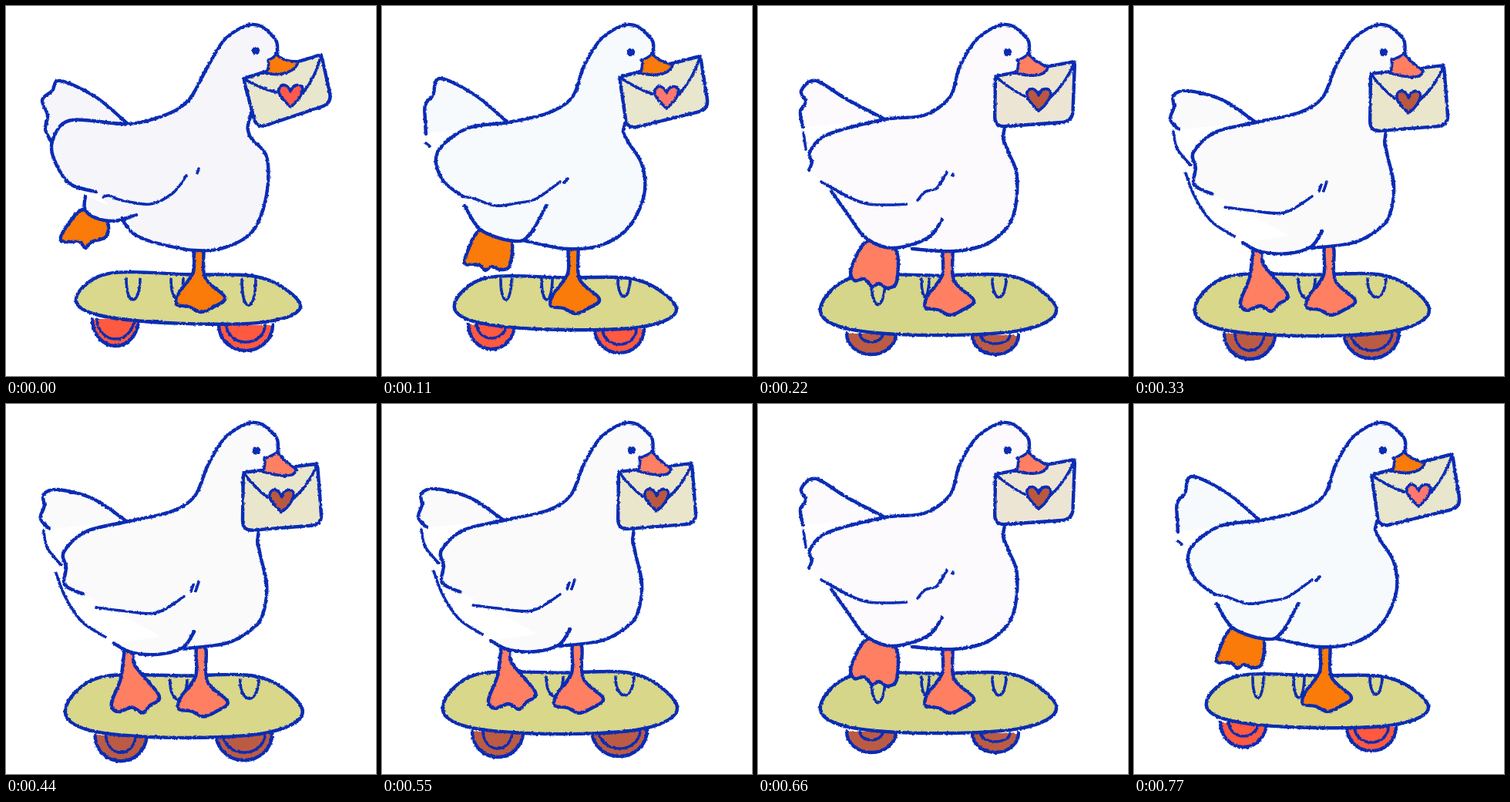
An HTML page that plays this animation: 480 px wide and 480 px high, repeating every 880 ms.

```html
<!DOCTYPE html>
<html lang="en">
<head>
<meta charset="utf-8">
<title>Skateboarding goose</title>
<style>
  html, body { margin: 0; width: 100%; height: 100%; overflow: hidden; background: #fff; }
  svg { display: block; width: 100%; height: 100%; }
  .pose { fill: none; stroke: #0a2cb4; stroke-width: 4.4; stroke-linecap: round; stroke-linejoin: round; }
  .fine { stroke-width: 3.6; }
</style>
</head>
<body>
<svg id="stage" viewBox="0 0 480 480">
  <filter id="crayon" x="0" y="0" width="480" height="480" filterUnits="userSpaceOnUse" color-interpolation-filters="sRGB">
    <feTurbulence type="fractalNoise" baseFrequency=".3" numOctaves="2" seed="4"/>
    <feDisplacementMap in="SourceGraphic" scale="3" xChannelSelector="R" yChannelSelector="G"/>
  </filter>
</svg>
<script>
const parse = text => text.trim().split(/\s+/).map(pair => pair.split(',').map(Number));

// Smooth curve through the points.
function curve(points, closed = false) {
  const n = points.length;
  const at = i => closed ? points[(i + n) % n] : points[Math.max(0, Math.min(n - 1, i))];
  let d = `M${at(0)}`;
  for (let i = 0; i < (closed ? n : n - 1); i++) {
    const [a, b, c, e] = [at(i - 1), at(i), at(i + 1), at(i + 2)];
    d += `C${b.map((v, k) => v + (c[k] - a[k]) / 6)} ${c.map((v, k) => v - (e[k] - b[k]) / 6)} ${c}`;
  }
  return d;
}
const curves = text => text.split('/').map(part => curve(parse(part))).join('');
const blob = text => curve(parse(text), true);
const path = (d, fill = 'none', kind = '', extra = '') => `<path d="${d}" fill="${fill}" class="${kind}" ${extra}/>`;

const HEAD = ' 262,78 285,42 318,24 342,35 351,62 ';
const FRONT_FOOT = blob('244,310 243,345 224,372 221,387 237,390 253,397 268,391 284,378 258,352 256,310');
const HEART = 'M0 15C-8 6-17 0-15-9C-11-17-3-14 0-5C3-15 13-16 16-9C15 2 8 9 0 15Z';
const BREAD = parse('0,.55 .14,.05 .5,.02 .83,.05 1,.58 .85,.92 .45,1 .1,.88');

const bread = ([left, right, top, bottom, tilt]) => curve(BREAD.map(([u, v]) =>
  [left + u * (right - left), top + v * (bottom - top) + tilt * (u - .5)]), true);

const slit = ([x, w, bottom]) =>
  `M${x - w} 354C${x - w} ${bottom - 8} ${x - w / 2} ${bottom} ${x} ${bottom}S${x + w} ${bottom - 12} ${x + w} 354`;

const bowl = (x, y, rx, ry) => `M${x - rx} ${y}A${rx} ${ry} 0 0 0 ${x + rx} ${y}`;
const wheel = ([x, y, rx, ry, hubX, hubY], color) =>
  path(bowl(x, y, rx, ry), color) + path(bowl(x, y, hubX, hubY), 'none', 'fine');

function envelope(corners, [hx, hy], paper, red) {
  const [tl, tr] = corners;
  const toward = (a, b, r) => {
    const length = Math.hypot(b[0] - a[0], b[1] - a[1]);
    return a.map((v, k) => v + (b[k] - v) * r / length);
  };
  const outline = corners.map((p, i) => {
    const r = i < 2 ? 5 : 14;
    return `${i ? 'L' : 'M'}${toward(p, corners[(i + 3) % 4], r)}Q${p} ${toward(p, corners[(i + 1) % 4], r)}`;
  }).join('') + 'Z';
  const fold = (a, b, dx) => `M${a}Q${(a[0] + b[0]) / 2 + dx} ${(a[1] + b[1]) / 2 + 4} ${b}`;
  return path(outline, paper) +
    path(fold(tl, [hx - 18, hy - 4], 0) + fold([hx + 16, hy - 3], tr, 5), 'none', 'fine') +
    path(HEART, red, 'fine', `transform="translate(${hx} ${hy})"`);
}

const beak = ([x, tipX, tipY]) =>
  `M${x} 87Q${x + 4} 78 ${x + 2} 70Q${x + 9} 68 351 62Q358 72 ${tipX} ${tipY}C${tipX - 2} ${tipY + 13} ${x + 18} 92 ${x} 87Z`;

const warm = { orange: '#fa7a0a', red: '#ff593f', crust: '#d9d88c', paper: '#e8e6cc' };
const dusk = { orange: '#ff7f63', red: '#bc5b44', crust: '#d9d78a', paper: '#eae6cc', heart: '#b9583f' };

// Four drawings, from the leg swung back to both feet on the board.
const kick = {
  ...warm, heart: '#ff5a4a', white: '#f6f6fa',
  eye: [324, 58], beak: [338, 379, 72], front: [0, 0],
  wheels: [[142, 406, 30, 35, 24, 26], [311, 414, 35, 33, 25, 22]],
  board: [91, 382, 347, 412, 8],
  slits: [[165, 9, 381], [222, 8, 380], [315, 9, 388]],
  foot: '100,264 76,290 72,305 95,306 103,314 111,306 130,299 130,278',
  tail: '60,178 51,160 54,142 47,122 60,110 70,97 115,117 158,153',
  body: '117,241 82,230 61,195 62,170 85,148 158,153 205,142 237,122' + HEAD +
    '318,140 316,168 338,195 338,245 320,292 285,313 245,317 190,306 165,295 150,276',
  thigh: '169,271 140,279 112,273 102,262 103,247',
  lines: '126,248 134,246 150,252 187,257 216,243 234,220/248,217 250,211',
  corners: '308,94 409,63 423,126 325,159', seal: [369, 116]
};

const swing = {
  ...warm, heart: '#ff786c', white: '#f7fafd',
  eye: [323, 60], beak: [335, 377, 76], front: [-2, 2],
  wheels: [[142, 413, 30, 32, 19, 18], [308, 419, 32, 31, 22, 20]],
  board: [94, 382, 351, 420, 4],
  slits: [[161, 7, 381], [214, 7, 381], [314, 8, 377]],
  foot: '128,290 108,326 109,335 126,336 134,343 142,338 154,342 166,336 166,300',
  tail: '57,166 56,148 56,128 66,116 75,94 120,115 163,151',
  body: '105,247 78,225 72,190 110,159 163,151 215,139 247,118' + HEAD +
    '316,150 317,172 337,205 340,245 320,287 285,310 240,315 183,304',
  thigh: '213,259 192,296 172,305 129,291 107,259',
  lines: '105,247 120,250 147,259 173,256 200,250 231,228/236,229 241,224/57,178 62,182',
  corners: '308,92 413,65 424,134 318,160', seal: [369, 118]
};

const step = {
  ...dusk, crust: '#d5d689', paper: '#ede5d3', white: '#fcfafd',
  eye: [324, 60], beak: [335, 376, 79], front: [-4, 4],
  wheels: [[147, 425, 32, 27, 15, 11], [308, 427, 30, 25, 19, 11]],
  board: [81, 387, 348, 427, 0],
  slits: [[156, 9, 387], [217, 5, 377], [313, 9, 378]],
  foot: '142,305 121,340 125,356 138,354 148,364 157,360 168,366 180,357 178,315',
  tail: '58,157 55,137 62,124 56,110 75,97 115,121 165,147',
  body: '66,213 70,202 67,190 90,167 165,147 215,142 249,118' + HEAD +
    '320,158 323,185 336,220 330,275 300,307 255,318 200,315',
  thigh: '239,277 220,301 175,314 140,301 117,271 95,240',
  lines: '82,228 120,249 143,257 173,258 193,257/207,252 217,241 232,236 245,216/252,220 253,218/59,164 62,186',
  corners: '308,91 411,72 408,150 307,157', seal: [364, 121]
};

const stand = {
  ...dusk, white: '#fafafb',
  eye: [324, 60], beak: [332, 375, 84], front: [3, 4],
  wheels: [[150, 425, 33, 33, 19, 22], [308, 423, 36, 34, 27, 24]],
  board: [79, 383, 347, 428, 0],
  slits: [[224, 11, 379], [315, 12, 378]],
  foot: '156,312 150,352 138,384 146,395 164,389 178,396 187,387 199,374 168,335 167,312',
  tail: '58,160 47,147 52,131 51,116 70,110 115,122 158,151',
  body: '102,244 78,232 80,210 77,190 105,164 158,151 215,138 245,118' + HEAD +
    '327,163 328,190 337,232 332,270 318,289 285,307 230,314',
  thigh: '244,292 230,312 200,321 165,319 141,307',
  lines: '130,299 100,279 79,248 67,217/118,261 150,265 195,268 231,247/240,240 243,232/246,240 250,228/51,163 56,185 73,206',
  corners: '307,88 402,77 408,155 306,163', seal: [356, 124]
};

// The settled pose sinks a little at the middle of the loop.
const sink = { ...stand, transform: 'translate(240 20) scale(1.012) translate(-240 -20)' };

function draw(p) {
  const group = document.createElementNS('http://www.w3.org/2000/svg', 'g');
  group.setAttribute('class', 'pose');
  group.setAttribute('filter', 'url(#crayon)');
  if (p.transform) group.setAttribute('transform', p.transform);
  group.innerHTML =
    p.wheels.map(w => wheel(w, p.red)).join('') +
    path(bread(p.board), p.crust) + path(p.slits.map(slit).join(''), 'none', 'fine') +
    path(blob(p.foot), p.orange) +
    path(FRONT_FOOT, p.orange, '', `transform="translate(${p.front})"`) +
    path(curves(p.tail), p.white) + path(curves(p.body + '/' + p.thigh), p.white) +
    path(curves(p.lines), 'none', 'fine') +
    envelope(parse(p.corners), p.seal, p.paper, p.heart) +
    path(beak(p.beak), p.orange, 'fine') +
    `<circle cx="${p.eye[0]}" cy="${p.eye[1]}" r="5.2" fill="#0a2cb4" stroke="none"/>`;
  return document.getElementById('stage').appendChild(group);
}

const poses = [kick, swing, step, stand, sink].map(draw);
const STEP = 110, COUNT = 8;
const start = performance.now();

function render(now) {
  const i = Math.floor(Math.max(0, now - start) / STEP) % COUNT;
  const current = Math.min(i, COUNT - i);
  poses.forEach((g, n) => { g.style.display = n === current ? '' : 'none'; });
  requestAnimationFrame(render);
}
render(start);
</script>
</body>
</html>
```
